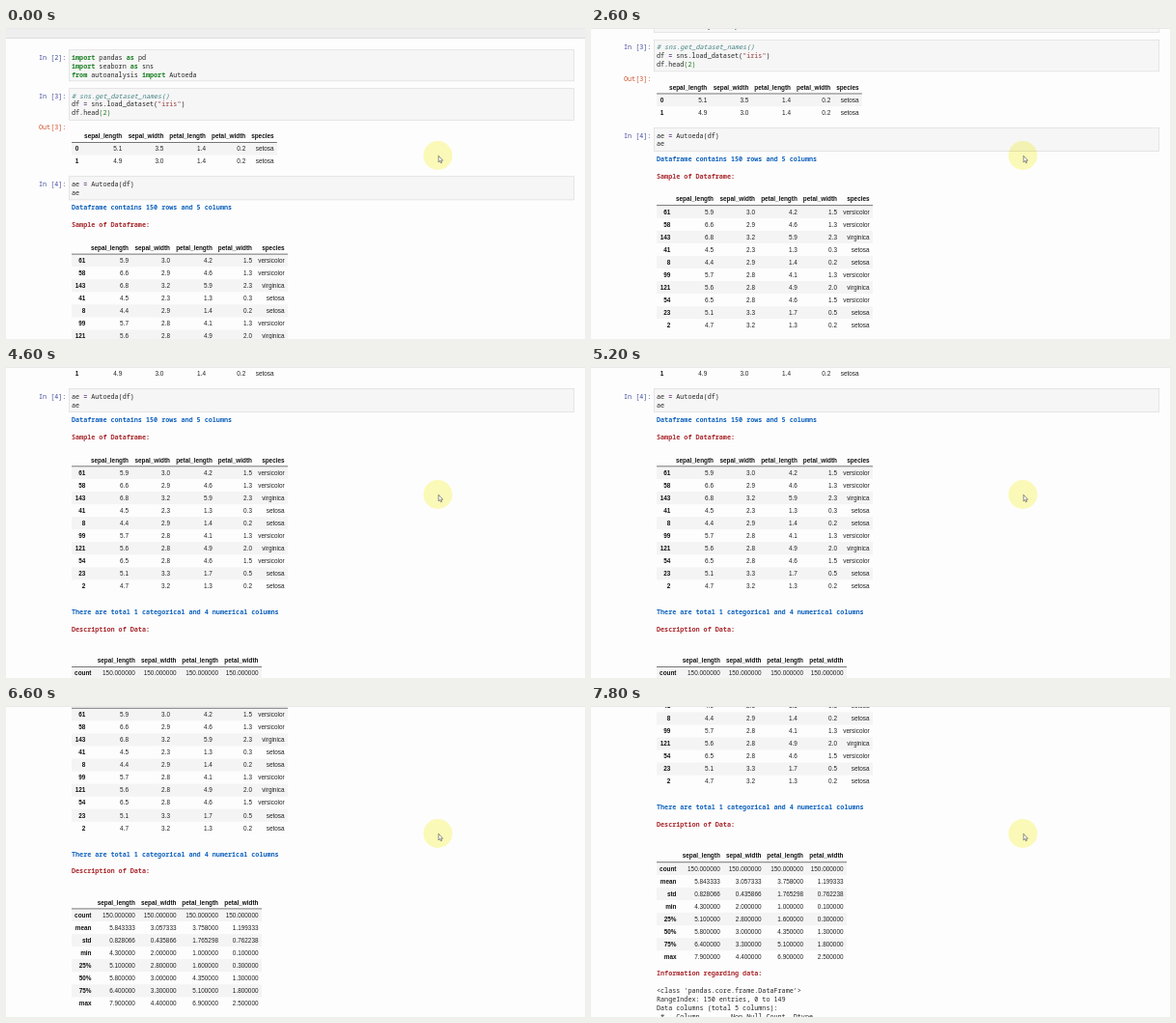
Write an HTML page that moves like this. It is 600 px wide and 322 px high and loops after 8 s.

```html
<!DOCTYPE html>
<html lang="en">
<head>
<meta charset="utf-8">
<title>Notebook scroll</title>
<style>
html, body { margin: 0; width: 100%; height: 100%; overflow: hidden; background: #fdfdfd; }
svg { display: block; width: 100%; height: 100%; }
text { white-space: pre; }
.mono { font: 6.76px "Noto Sans Mono", "DejaVu Sans Mono", monospace; fill: #262626; }
.cell { font: 6.4px "Liberation Sans", Arial, sans-serif; fill: #222; text-anchor: end; }
.b { font-weight: 700; fill: #111; }
.key { fill: #1a7f22; font-weight: 700; }
.op { fill: #6d4a86; font-weight: 700; }
.str { fill: #97393c; }
.num { fill: #2a7a2a; }
.note { fill: #408080; font-style: italic; }
.blue { fill: #0f62bd; font-weight: 700; }
.red { fill: #a9282d; font-weight: 700; }
.in { fill: #404c9c; }
.out { fill: #d0522c; }
</style>
</head>
<body>
<svg viewBox="0 0 600 322" preserveAspectRatio="none">
  <rect width="600" height="322" fill="#fdfdfd"/>
  <g id="page"></g>
  <rect width="600" height="1" fill="#e9e9e9"/>
  <circle cx="447.5" cy="132" r="15" fill="#fcfbb9" style="mix-blend-mode:multiply"/>
  <path d="M448.2 132.3v6.6l1.5-1.3 1 2.2 1-.5-1-2.1h2z" fill="#fff" stroke="#444" stroke-width=".6"/>
</svg>
<script>
const NS = "http://www.w3.org/2000/svg";
const page = document.getElementById("page");

function add(tag, attrs, parent = page) {
  const el = document.createElementNS(NS, tag);
  for (const k in attrs) el.setAttribute(k, attrs[k]);
  return parent.appendChild(el);
}

const rect = (x, y, width, height, fill, extra) => add("rect", { x, y, width, height, fill, ...extra });

// y is the middle of the line; parts are strings or [class, string]
function line(x, y, ...parts) {
  const el = add("text", { x, y: y + 2.4, class: "mono" });
  for (const p of parts) {
    const [cls, str] = Array.isArray(p) ? p : ["", p];
    add("tspan", { class: cls }, el).textContent = str;
  }
}

function codeCell(n, top, bottom, first, rows) {
  rect(65.3, top, 523.4, bottom - top, "#f6f6f6", { stroke: "#dcdcdc", "stroke-width": .7 });
  line(34, first, ["in", `In [${n}]:`]);
  rows.forEach((row, i) => line(68, first + i * 8.9, ...row));
}

function table(headY, right, cols, heads, rows) {
  const put = (str, x, y, bold) => {
    add("text", { x, y: y + 2.3, class: bold ? "cell b" : "cell" }).textContent = str;
  };
  rows.forEach((row, i) => {
    const y = headY + 13.2 + i * 13.05;
    if (i % 2 === 0) rect(68, y - 6.5, right - 68, 13.05, "#f4f4f4");
    row.split(" ").forEach((v, c) => put(v, cols[c], y, c === 0));
  });
  heads.forEach((h, c) => put(h, cols[c + 1], headY, true));
  rect(68, headY + 6.2, right - 68, .8, "#555");
}

const kw = s => ["key", s], op = s => ["op", s];
const measures = ["sepal_length", "sepal_width", "petal_length", "petal_width"];

rect(0, 0, 600, 10, "#eeeeee");
rect(0, 10, 600, 1, "#dedede");

codeCell(2, 22.7, 54.8, 30.3, [
  [kw("import"), " pandas ", kw("as"), " pd"],
  [kw("import"), " seaborn ", kw("as"), " sns"],
  [kw("from"), " autoanalysis ", kw("import"), " Autoeda"]
]);
codeCell(3, 62.7, 95.3, 70.1, [
  [["note", "# sns.get_dataset_names()"]],
  ["df ", op("="), " sns.load_dataset(", ["str", '"iris"'], ")"],
  ["df.head", ["num", "(2)"]]
]);
line(34, 102.8, ["out", "Out[3]:"]);
table(111.8, 280.8, [75.2, 120.2, 163.3, 207, 248.2, 277.6], [...measures, "species"], [
  "0 5.1 3.5 1.4 0.2 setosa",
  "1 4.9 3.0 1.4 0.2 setosa"
]);

codeCell(4, 153.7, 177.9, 161.6, [["ae ", op("="), " Autoeda(df)"], ["ae"]]);
line(68, 186, ["blue", "Dataframe contains 150 rows and 5 columns"]);
line(68, 203.7, ["red", "Sample of Dataframe:"]);
table(227.5, 292, [82.4, 127, 170, 213.8, 255, 288.6], [...measures, "species"], [
  "61 5.9 3.0 4.2 1.5 versicolor",
  "58 6.6 2.9 4.6 1.3 versicolor",
  "143 6.8 3.2 5.9 2.3 virginica",
  "41 4.5 2.3 1.3 0.3 setosa",
  "8 4.4 2.9 1.4 0.2 setosa",
  "99 5.7 2.8 4.1 1.3 versicolor",
  "121 5.6 2.8 4.9 2.0 virginica",
  "54 6.5 2.8 4.6 1.5 versicolor",
  "23 5.1 3.3 1.7 0.5 setosa",
  "2 4.7 3.2 1.3 0.2 setosa"
]);

line(68, 385, ["blue", "There are total 1 categorical and 4 numerical columns"]);
line(68, 402.5, ["red", "Description of Data:"]);
table(435.2, 265, [88.5, 133.8, 176.5, 220, 261.5], measures, [
  "count 150.000000 150.000000 150.000000 150.000000",
  "mean 5.843333 3.057333 3.758000 1.199333",
  "std 0.828066 0.435866 1.765298 0.762238",
  "min 4.300000 2.000000 1.000000 0.100000",
  "25% 5.100000 2.800000 1.600000 0.300000",
  "50% 5.800000 3.000000 4.350000 1.300000",
  "75% 6.400000 3.300000 5.100000 1.800000",
  "max 7.900000 4.400000 6.900000 2.500000"
]);

line(68, 557, ["red", "Information regarding data:"]);
[
  "<class 'pandas.core.frame.DataFrame'>",
  "RangeIndex: 150 entries, 0 to 149",
  "Data columns (total 5 columns):",
  " #   Column        Non-Null Count  Dtype"
].forEach((s, i) => line(68, 574.7 + i * 8.9, s));

// Each wheel notch glides the page up by the same distance.
const LOOP = 8000, STEP = 200, NOTCH = 43.75, GLIDE = 300;
const notches = [1500, 2526, 3470, 5200, 6050, 6491, 7670];

function glide(x) {
  x = Math.min(1, Math.max(0, x));
  return x * x * (3 - 2 * x);
}

function draw(ms) {
  const t = Math.floor(ms % LOOP / STEP) * STEP;
  const y = notches.reduce((sum, start) => sum + NOTCH * glide((t - start) / GLIDE), 0);
  page.setAttribute("transform", `translate(0 ${-y.toFixed(2)})`);
}

const begin = performance.now();
function tick() {
  draw(performance.now() - begin);
  requestAnimationFrame(tick);
}
tick();
</script>
</body>
</html>
```
